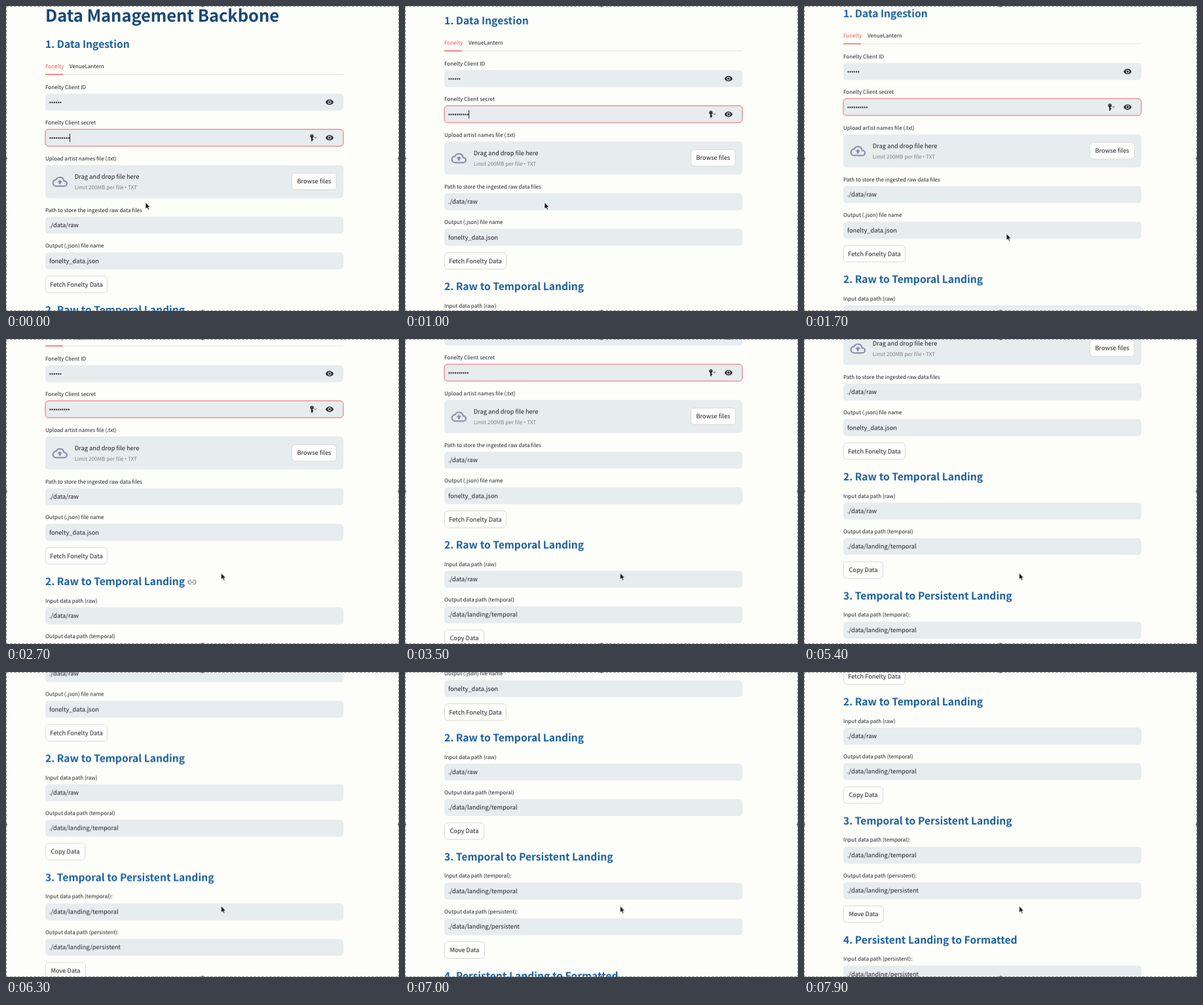
Write an HTML page that moves like this. It is 600x466 px and loops after 8000 ms.

```html
<!DOCTYPE html>
<html lang="en">
<head>
<meta charset="utf-8">
<title>Data Management Backbone</title>
<style>
  html, body { margin: 0; width: 100%; height: 100%; overflow: hidden; background: #fdfdfa; }
  svg { display: block; overflow: hidden; }
  text {
    font-family: "Noto Sans CJK JP", "Noto Sans CJK SC", "Noto Sans CJK KR", "Open Sans", sans-serif;
    fill: #1d1e27;
    text-rendering: geometricPrecision;
  }
  .title { font-size: 25.55px; font-weight: 700; letter-spacing: -.1px; fill: #184877; }
  .heading { font-size: 15.64px; font-weight: 600; fill: #1a609f; }
  .label { font-size: 8.12px; }
  .value { font-size: 9.3px; }
  .hint { font-size: 8.15px; fill: #7f818b; }
  .bullet { font-family: "Open Sans", sans-serif; }
  .active { fill: #f9544f; }
  .center { text-anchor: middle; }
  .box { fill: #e7ecee; }
  .focus { stroke: #ee6462; }
  .button { fill: #fefefc; stroke: #d6d9d8; }
  .icon { fill: #23242d; fill-rule: evenodd; }
  .line { fill: none; stroke: #23242d; }

  #page { animation: scroll 8s infinite; }
  #pointer { animation: point 8s infinite; }
  #caret { animation: blink 1s step-end infinite; }
  #link { animation: hover 8s step-end infinite; }

  /* Each flick of the page starts fast and slows to a stop. */
  @keyframes scroll {
    0% { transform: translateY(0); animation-timing-function: cubic-bezier(.3, .4, .5, .9); }
    12.5% { transform: translateY(-36px); animation-timing-function: linear; }
    23.75% { transform: translateY(-50px); animation-timing-function: cubic-bezier(.25, .4, .4, 1); }
    33.75%, 35% { transform: translateY(-94px); animation-timing-function: cubic-bezier(.25, .4, .5, .9); }
    52.5% { transform: translateY(-172px); animation-timing-function: linear; }
    55% { transform: translateY(-185px); animation-timing-function: cubic-bezier(.25, .4, .4, 1); }
    67.5%, 72.5% { transform: translateY(-254px); animation-timing-function: cubic-bezier(.25, .4, .4, 1); }
    87.5%, 90% { transform: translateY(-364px); animation-timing-function: cubic-bezier(.3, .35, .6, .8); }
    98.75%, 100% { transform: translateY(-419px); }
  }
  @keyframes point {
    0%, 15% { transform: translate(213px, 300px); animation-timing-function: ease-in-out; }
    23.75%, 100% { transform: translate(328.5px, 357.5px); }
  }
  @keyframes blink { 0% { opacity: 1; } 50%, 100% { opacity: 0; } }
  @keyframes hover { 0% { opacity: 0; } 31.25% { opacity: 1; } 40%, 100% { opacity: 0; } }
</style>
</head>
<body>
<svg width="600" height="466" viewBox="0 0 600 466">
  <g id="page"></g>
  <g fill="none" stroke="#8f9090" stroke-dasharray="4 2">
    <path d="M0 .5H600M0 465.5H600M.5 0V466M599.5 0V466"/>
  </g>
  <g fill="#6f7070">
    <circle cx="300" cy="0" r="2"/><circle cx="300" cy="466" r="2"/>
    <circle cx="0" cy="233" r="2"/><circle cx="600" cy="233" r="2"/>
  </g>
  <path id="pointer" d="M0 0V10L2.3 8 3.9 11.5 5.5 10.8 4 7.4H7Z" fill="#111" stroke="#fff" stroke-width=".7"/>
</svg>
<script>
  const LEFT = 60, WIDTH = 455;

  const text = (x, y, cls, str) => `<text x="${x}" y="${y}" class="${cls}">${str}</text>`;
  const box = (y, h, cls) =>
    `<rect x="${LEFT}" y="${y - h / 2}" width="${WIDTH}" height="${h}" rx="5" class="${cls}"/>`;
  // Every y below is the vertical middle of the part.
  const heading = (y, str) => text(LEFT, y + 5.6, 'heading', str);
  const label = (y, str) => text(LEFT, y + 3.1, 'label', str);
  const button = (x, y, w, str) =>
    `<rect x="${x + .5}" y="${y - 12.7}" width="${w - 1}" height="25.4" rx="5" class="button"/>` +
    text(x + w / 2, y + 3.4, 'value center', str);
  const field = (y, name, value) =>
    label(y, name) + box(y + 23.5, 25.8, 'box') + text(66, y + 26.7, 'value', value);

  const eye = y => `<path class="icon" transform="translate(487.4 ${y - 6.6}) scale(.55)"
    d="M12 4.5C7 4.5 2.7 7.6 1 12c1.7 4.4 6 7.5 11 7.5s9.3-3.1 11-7.5c-1.7-4.4-6-7.5-11-7.5z
       M12 17a5 5 0 110-10 5 5 0 010 10zm0-8a3 3 0 100 6 3 3 0 000-6z"/>`;
  const dots = (y, count) => Array.from({ length: count }, (_, i) =>
    `<circle cx="${67.5 + i * 3.15}" cy="${y}" r="1.15" class="icon"/>`).join('');
  const secret = (y, name, count, cls) =>
    label(y, name) + box(y + 23.5, 25.8, cls) + dots(y + 24, count) + eye(y + 23.5);

  const key = `<g transform="translate(467 201)">
    <path class="icon" d="M0-5a2.8 2.8 0 011 5.4V5L0 6-1 5V.4A2.8 2.8 0 010-5zm0 1.2a.7.7 0 100 1.4.7.7 0 000-1.4z"/>
    <path class="icon" d="M0 2H2.2V3.8H0z"/>
    <path class="line" d="M3.8-.6L5.4 1 7-.6"/></g>`;

  const cloud = `<path transform="translate(70.6 256.8) scale(.97)" fill="#8289a6" fill-rule="evenodd"
    d="M19.35 10A7.5 7.5 0 0012 4C9.1 4 6.6 5.6 5.35 8A6 6 0 000 14c0 3.3 2.7 6 6 6h13a5 5 0 00.35-10z
       M19 18H6a4 4 0 01-.44-7.97l1.07-.11.5-.95A5.5 5.5 0 0117.4 10.4l.3 1.5 1.5.1A3 3 0 0119 18z
       M8 13h2.55v3h2.9v-3H16l-4-4z"/>`;

  const link = `<g id="link" transform="translate(284 465.5)"><path class="line" style="stroke:#80828a"
    stroke-width="1.3" d="M-1-2.8H-3.2a2.8 2.8 0 000 5.6H-1M1-2.8H3.2a2.8 2.8 0 010 5.6H1M-2.6 0H2.6"/></g>`;

  const section = (y, name, input, from, output, to, action, w) =>
    heading(y, name) + field(y + 29, input, from) + field(y + 83.2, output, to) +
    button(LEFT, y + 142.5, w, action);

  const temporal = './data/landing/temporal', persistent = './data/landing/persistent';

  document.getElementById('page').innerHTML = [
    text(LEFT, 24, 'title', 'Data Management Backbone'),
    heading(58, '1. Data Ingestion'),
    text(LEFT, 94.6, 'label active', 'Fonelty'),
    text(97, 94.6, 'label', 'VenueLantern'),
    `<path d="M60 104.7H515" stroke="#e0e3e3"/><path d="M60 104.6H87" stroke="#f9544f" stroke-width="1.4"/>`,

    secret(123.5, 'Fonelty Client ID', 6, 'box'),
    secret(177.8, 'Fonelty Client secret', 10, 'box focus'),
    `<path id="caret" class="line" d="M97.6 195V208"/>`,
    key,

    label(232.5, 'Upload artist names file (.txt)'),
    box(268.3, 50.4, 'box'),
    cloud,
    text(104.7, 264.4, 'value', 'Drag and drop file here'),
    text(104.7, 280.4, 'hint', 'Limit 200MB per file <tspan class="bullet">•</tspan> TXT'),
    button(436, 268, 69, 'Browse files'),

    field(311.5, 'Path to store the ingested raw data files', './data/raw'),
    field(365.9, 'Output (.json) file name', 'fonelty_data.json'),
    button(LEFT, 425.3, 95, 'Fetch Fonelty Data'),

    section(464.5, '2. Raw to Temporal Landing', 'Input data path (raw)', './data/raw',
      'Output data path (temporal)', temporal, 'Copy Data', 61),
    link,
    section(646.4, '3. Temporal to Persistent Landing', 'Input data path (temporal):', temporal,
      'Output data path (persistent):', persistent, 'Move Data', 62),
    heading(828, '4. Persistent Landing to Formatted'),
    field(857, 'Input data path (persistent):', persistent)
  ].join('');
</script>
</body>
</html>
```
